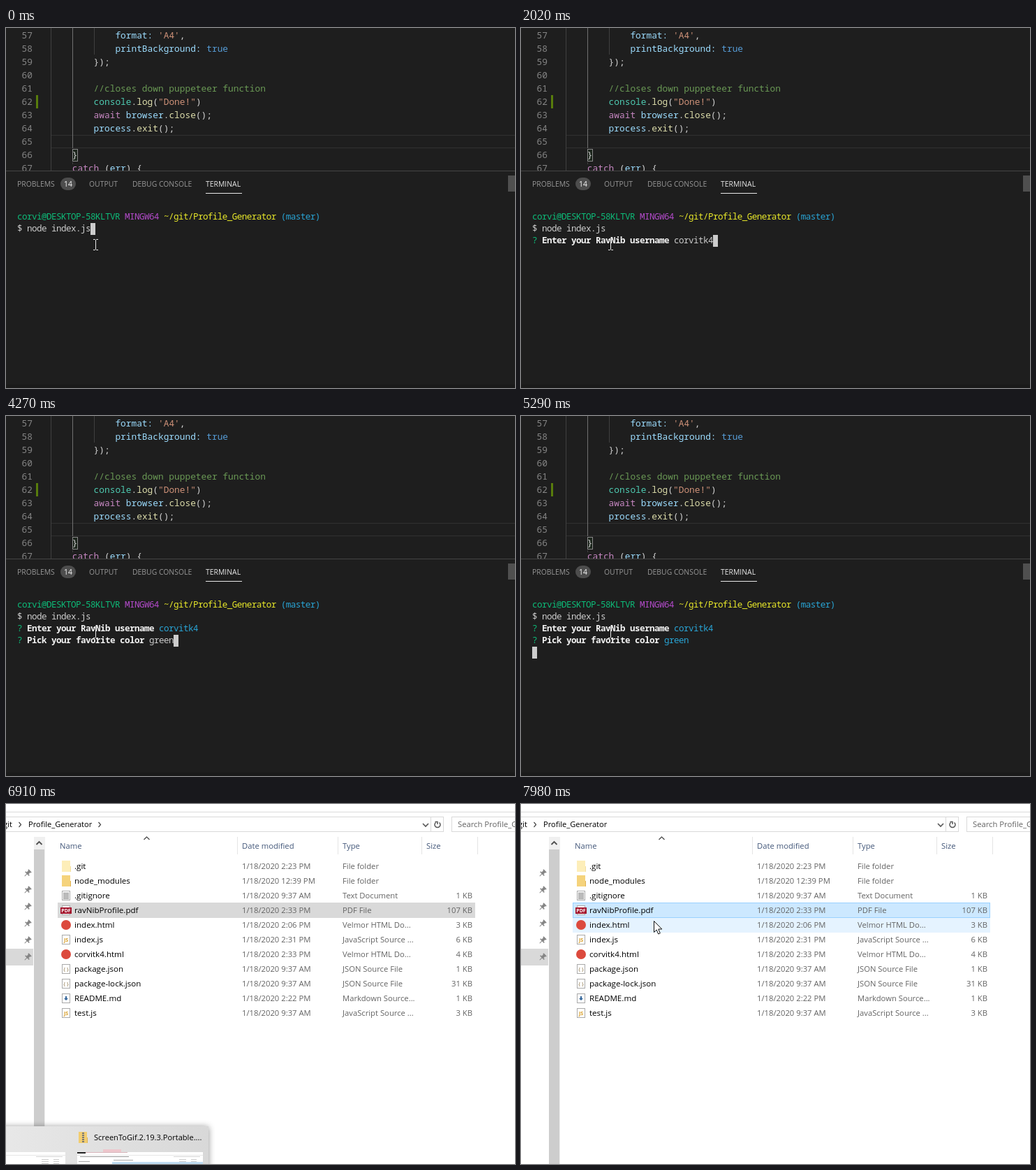
Animation, 729 px wide and 515 px high, one loop 8 s. Source, as an HTML page:

```html
<!DOCTYPE html>
<html lang="en">
<head>
<meta charset="utf-8">
<title>Profile generator demo</title>
<style>
  html, body { margin: 0; width: 100%; height: 100%; overflow: hidden; background: #1e1e1e; }
  svg { display: block; }
  text { white-space: pre; font-family: "Open Sans", "Noto Sans", sans-serif; }
  .code text { font: 12.83px "Noto Sans Mono", "DejaVu Sans Mono", monospace; fill: #d4d4d4; }
  .term text { font: 12.6px "Noto Sans Mono", "DejaVu Sans Mono", monospace; letter-spacing: -.56px; fill: #ccc; }
  .term .b { font-weight: 700; fill: #f2f2f2; }
  .tabs text { font-size: 10.4px; fill: #979797; }
  .files text { font-size: 11.25px; fill: #636363; }
  .files .name { font-size: 11.6px; fill: #000; }
  .files .head { fill: #44587a; }
  .files .bar { font-size: 11.1px; fill: #000; }
  .thin { fill: none; stroke: #444; stroke-width: 1.2; }
</style>
</head>
<body>
<svg id="stage" width="729" height="515" viewBox="0 0 729 515"></svg>
<script>
const LOOP = 8000;
const USER = 'corvi', LOGIN = 'corvitk4', COLOR = 'green';
const loginAt = [1070, 1160, 1330, 1480, 1550, 1700, 1770, 1940];
const colorAt = [3490, 3710, 3960, 4110, 4270];

const rect = (x, y, w, h, fill, more = '') =>
  `<rect x="${x}" y="${y}" width="${w}" height="${h}" fill="${fill}" ${more}/>`;
const text = (x, y, s, more = '') => `<text x="${x}" y="${y}" ${more}>${s}</text>`;
const path = (d, more = 'class="thin"') => `<path d="${d}" ${more}/>`;
const paint = (fill, s) => `<tspan fill="${fill}">${s}</tspan>`;

// Code editor
const blue = s => paint('#9cdcfe', s), fn = s => paint('#dcdcaa', s),
      str = s => paint('#ce9178', s), key = s => paint('#c586c0', s);

function editor() {
  const lines = [
    [12, blue('format:') + ' ' + str("'A4'") + ','],
    [12, blue('printBackground:') + ' ' + paint('#569cd6', 'true')],
    [8, '});'],
    [0, ''],
    [8, paint('#6a9955', '//closes down puppeteer function')],
    [8, paint('#4ec9b0', 'console') + '.' + fn('log') + '(' + str('"Done!"') + ')'],
    [8, key('await') + ' ' + blue('browser') + '.' + fn('close') + '();'],
    [8, blue('process') + '.' + fn('exit') + '();'],
    [0, ''],
    [4, '}'],
    [4, key('catch') + ' (' + blue('err') + ') {']
  ];
  const body = lines.map(([col, s], i) =>
    text(38, 15 + 19 * i, 57 + i, 'text-anchor="end" style="fill:#858585"') +
    text(64 + col * 7.7, 15 + 19 * i, s)).join('');
  return `<clipPath id="pane"><rect width="729" height="204"/></clipPath>
    <g class="code" clip-path="url(#pane)">
    ${rect(64, 153, 665, 1, '#303030')}${rect(64, 171, 665, 1, '#303030')}
    ${rect(64, 0, 1, 204, '#404040')}${rect(95, 0, 1, 172, '#707070')}${rect(95, 192, 1, 3, '#404040')}
    ${rect(126, 0, 1, 38, '#404040')}${rect(43, 96, 3, 19, '#587c0c')}
    ${rect(95.5, 173.5, 7, 17, '#1c251c', 'stroke="#888"')}
    ${body}</g>`;
}

function tabs() {
  return `<g class="tabs">${rect(0, 204, 729, 1, '#454545')}
    ${text(16, 227, 'PROBLEMS')}
    ${rect(78, 214, 22, 18, '#4d4d4d', 'rx="9"')}
    ${text(89, 227, '14', 'text-anchor="middle" style="fill:#fff"')}
    ${text(119, 227, 'OUTPUT')}${text(181, 227, 'DEBUG CONSOLE')}
    ${text(286, 227, 'TERMINAL', 'style="fill:#e7e7e7"')}
    ${rect(286, 236, 52, 1, '#e7e7e7')}${rect(719, 211, 10, 23, '#4f4f4f')}
    ${rect(0, 510, 729, 5, '#1a1a1a')}</g>`;
}

// Terminal, on a grid of 7 by 17 pixels
const cyan = s => paint('#29a5d6', s);
const row = (n, s) => text(16, 274 + 17 * n, s);
const prompt = n => row(n, paint('#0dbc79', USER + '@DESKTOP-58KLTVR') + ' ' +
  paint('#b44bcb', 'MINGW64') + ' ' + paint('#eaea2a', '~/git/Profile_Generator') + ' ' + cyan('(master)'));
const ask = (n, q, a) => row(n, `${paint('#0dbc79', '?')} <tspan class="b">${q}</tspan> ${a}`);
const typed = (word, times, t) => word.slice(0, times.filter(at => at <= t).length);

function terminal(t) {
  const q1 = 'Enter your RavNib username', q2 = 'Pick your favorite color';
  const login = typed(LOGIN, loginAt, t), color = typed(COLOR, colorAt, t);
  let out = prompt(0) + row(1, '$ node index.js'), at = [15, 1];
  if (t >= 370) at = [0, 2];
  if (t >= 820) {
    out += ask(2, q1, t < 2940 ? login : cyan(login));
    at = [q1.length + 3 + login.length, 2];
  }
  if (t >= 2940) {
    out += ask(3, q2, t < 5290 ? color : cyan(color));
    at = [q2.length + 3 + color.length, 3];
  }
  if (t >= 5290) at = [0, 4];
  if (t >= 5550) { out += row(4, 'Done!'); at = [0, 5]; }
  if (t >= 6170) { out += prompt(6) + row(7, '$'); at = [2, 7]; }
  const x = 16 + at[0] * 7, y = 262 + at[1] * 17;
  out += t < 6690 ? rect(x, y, 7, 17, '#ccc')
    : rect(x + .5, y + .5, 6, 16, 'none', 'stroke="#ccc"');
  if (t < 6690) out += path('M125 302.5h2.5l1 1 1-1h2.5M128.5 303v14M125 317.5h2.5l1-1 1 1h2.5',
    'fill="none" stroke="#e8e8e8"');
  return out;
}

// File list
const page = y => rect(80.5, y - 6.5, 11, 13, '#fff', 'stroke="#aaa"');
const label = (y, s, fill, size) =>
  text(86, y + 3, s, `text-anchor="middle" style="font-size:${size}px;font-weight:700;fill:${fill}"`);
const folder = (x, y, fill, edge) => rect(x, y - 8, 12, 16, fill) + rect(x + 12, y, 1, 8, edge);
const icons = {
  dim: y => folder(80, y, '#fdeeb9', '#f3dfa0'),
  dir: y => folder(80, y, '#f5d37c', '#dfb352'),
  txt: y => page(y) + [-4, -2, 0, 2, 4].map(d => rect(82, y + d, 8, 1, '#777')).join(''),
  pdf: y => page(y) + rect(78, y - 4, 16, 9, '#a3122b') + label(y, 'PDF', '#fff', 7),
  web: y => `<circle cx="86" cy="${y}" r="7" fill="#dc4a3d"/>`,
  js: y => page(y) + label(y, 'JS', '#d79a1e', 7),
  json: y => page(y) + label(y - .5, '{ }', '#b0a080', 7),
  md: y => page(y) + path(`M85 ${y - 3}h2v3h2l-3 3-3-3h2z`, 'fill="#2f6299"')
};
const kinds = { dim: 'File folder', dir: 'File folder', txt: 'Text Document', pdf: 'PDF File',
  web: 'Velmor HTML Do...', js: 'JavaScript Source ...', json: 'JSON Source File', md: 'Markdown Source...' };
const files = [
  ['dim', '.git', '2:23 PM', ''],
  ['dir', 'node_modules', '12:39 PM', ''],
  ['txt', '.gitignore', '9:37 AM', '1 KB'],
  ['pdf', 'ravNibProfile.pdf', '2:33 PM', '107 KB'],
  ['web', 'index.html', '2:06 PM', '3 KB'],
  ['js', 'index.js', '2:31 PM', '6 KB'],
  ['web', LOGIN + '.html', '2:33 PM', '4 KB'],
  ['json', 'package.json', '9:37 AM', '1 KB'],
  ['json', 'package-lock.json', '9:37 AM', '31 KB'],
  ['md', 'README.md', '2:22 PM', '1 KB'],
  ['js', 'test.js', '9:37 AM', '3 KB']
];

function fileRows() {
  return files.map(([kind, name, time, size], i) => {
    const y = 89 + 21 * i;
    return icons[kind](y) + text(98, y + 4, name, 'class="name"') +
      text(338, y + 4, '1/18/2020 ' + time) + text(482, y + 4, kinds[kind]) +
      text(668, y + 4, size, 'text-anchor="end"');
  }).join('');
}

function explorer() {
  const pin = y => `<g transform="translate(31 ${y}) rotate(45)">
    ${rect(-3, -5, 6, 1.5, '#858585')}${rect(-2, -4, 4, 5, '#858585')}
    ${rect(-4, 0, 8, 1.5, '#858585')}${rect(-.5, 1, 1, 5, '#858585')}</g>`;
  return `${rect(0, 0, 729, 515, '#fff')}${rect(0, 11, 729, 1, '#dadada')}
    ${rect(-5.5, 18.5, 632, 21, '#fff', 'stroke="#d9d9d9"')}${rect(608, 19, 1, 20, '#d9d9d9')}
    ${rect(638.5, 18.5, 100, 21, '#fff', 'stroke="#d9d9d9"')}
    ${text(-4, 33, 'git', 'class="bar"')}${text(32, 33, 'Profile_Generator', 'class="bar"')}
    ${text(647, 33, 'Search Profile_Generator')}
    ${path('M18.5 26l3 3.5-3 3.5')}
    ${path('M132.5 26l3 3.5-3 3.5', 'id="crumb" class="thin"')}
    ${path('M597 28l4 4 4-4', 'fill="none" stroke="#555" stroke-width="1.6"')}
    ${path('M615.5 26.5a4 4 0 1 0 5 0M614.5 25.5h3.5v3.5', 'fill="none" stroke="#555" stroke-width="1.5"')}
    ${[331, 475, 595, 675].map(x => rect(x, 47, 1, 25, '#e5e5e5')).join('')}
    ${path('M197.5 51l4-4 4 4')}
    ${[[77, 'Name'], [338, 'Date modified'], [482, 'Type'], [602, 'Size']]
      .map(([x, s]) => text(x, 64, s, 'class="head"')).join('')}
    ${rect(40, 47, 16, 468, '#f0f0f0')}${rect(40, 65, 15, 450, '#cdcdcd')}
    ${path('M43.5 58l4-4 4 4', 'fill="none" stroke="#505050" stroke-width="1.8"')}
    ${rect(0, 207, 39, 24, '#d9d9d9')}
    ${[99, 123, 147, 171, 195, 219].map(pin).join('')}
    <g id="marks"></g>${fileRows()}`;
}

// Taskbar preview
function popup() {
  const thumb = (x, w) => rect(x, 498, w, 17, '#fff') + rect(x, 502, w, 1, '#e6e6e6') +
    rect(x + w - 42, 504, 38, 1, '#d5d5d5') +
    [508, 511, 514].map(y => rect(x + w - 34, y, 10, 1, '#ccc') + rect(x + w - 17, y, 8, 1, '#ccc')).join('');
  return `<g filter="url(#soft)">${rect(-9, 461, 299, 60, '#d0d0d0', 'id="back"')}</g>
    ${rect(93, 461, 197, 54, '#bebebe', 'id="front"')}
    ${path('M71.5 471.5l11 11M82.5 471.5l-11 11', 'id="cross" fill="none" stroke="#222" stroke-width="1.2"')}
    ${thumb(0, 85)}${thumb(102, 180)}
    ${rect(102, 498, 12, 2, '#222')}${rect(139, 494, 26, 4, '#edc6cc')}${rect(114, 498, 60, 1, '#d8b5bb')}
    ${rect(106, 504, 70, 1, '#999')}${rect(104, 511, 16, 1, '#aaa')}${rect(152, 512, 130, 3, '#bfdcf2')}
    ${rect(154, 509, 28, 1, '#aaa')}
    ${folder(104, 477, '#f2cd70', '#dfb352')}
    ${[470, 473, 476, 479, 482].map(y => rect(109, y, 3, 2, '#777')).join('')}
    ${text(126, 481, 'ScreenToGif.2.19.3.Portable....', 'style="font-size:11.1px;fill:#000"')}`;
}

const stage = document.getElementById('stage');
stage.innerHTML = `<defs>
    <filter id="soft" x="-10%" y="-40%" width="120%" height="180%">
      <feDropShadow dx="0" dy="1" stdDeviation="5" flood-opacity=".45"/></filter>
    <linearGradient id="glass"><stop stop-color="#e8e8e8"/><stop offset="1" stop-color="#d8d8d8"/></linearGradient>
  </defs>
  <g id="ide">${rect(0, 0, 729, 515, '#1e1e1e')}${editor()}${tabs()}<g id="term" class="term"></g></g>
  <g id="files" class="files">${explorer()}</g>
  <g id="popup">${popup()}</g>
  ${path('M0 0v16l3.7-3.5 2.5 6 2.6-1.1-2.5-5.9h5z',
    'id="mouse" fill="#fff" stroke="#111" stroke-linejoin="round"')}`;

const el = id => document.getElementById(id);
const show = (id, on) => el(id).setAttribute('visibility', on ? 'visible' : 'hidden');
const set = (id, name, value) => el(id).setAttribute(name, value);
let lastTerm, lastMarks;

function draw(t) {
  const browsing = t >= 6910, active = t >= 7300;
  show('ide', !browsing);
  show('files', browsing);
  show('crumb', browsing && !active);
  const term = terminal(t);
  if (term !== lastTerm) el('term').innerHTML = lastTerm = term;

  show('popup', t >= 6690 && t < 7450);
  set('popup', 'opacity', active ? .2 : 1);
  set('back', 'fill', browsing ? 'url(#glass)' : '#d0d0d0');
  show('front', t >= 6690 && !browsing);
  show('cross', t >= 6690 && !browsing);

  // The pointer travels in eight jumps and slows towards the list.
  const p = Math.min(7, Math.max(0, Math.floor((t - 7450) / 75.7))) / 7;
  const ease = 1 - (1 - p) ** 2;
  const x = 150 + 40 * ease, y = 491 - 324 * ease;
  show('mouse', t >= 7450);
  set('mouse', 'transform', `translate(${x + .5} ${y + .5})`);

  let marks = active ? rect(74.5, 141.5, 597, 21, '#cce8ff', 'stroke="#99d1ff"')
    : rect(74, 141, 598, 22, '#d9d9d9');
  const over = Math.floor((y - 78) / 21);
  if (t >= 7450 && over < files.length) marks += rect(74, 79 + 21 * over, 598, 21, '#e5f3ff');
  if (marks !== lastMarks) el('marks').innerHTML = lastMarks = marks;
}

const start = performance.now();
function tick() {
  draw((performance.now() - start) % LOOP);
  requestAnimationFrame(tick);
}
tick();
</script>
</body>
</html>
```
